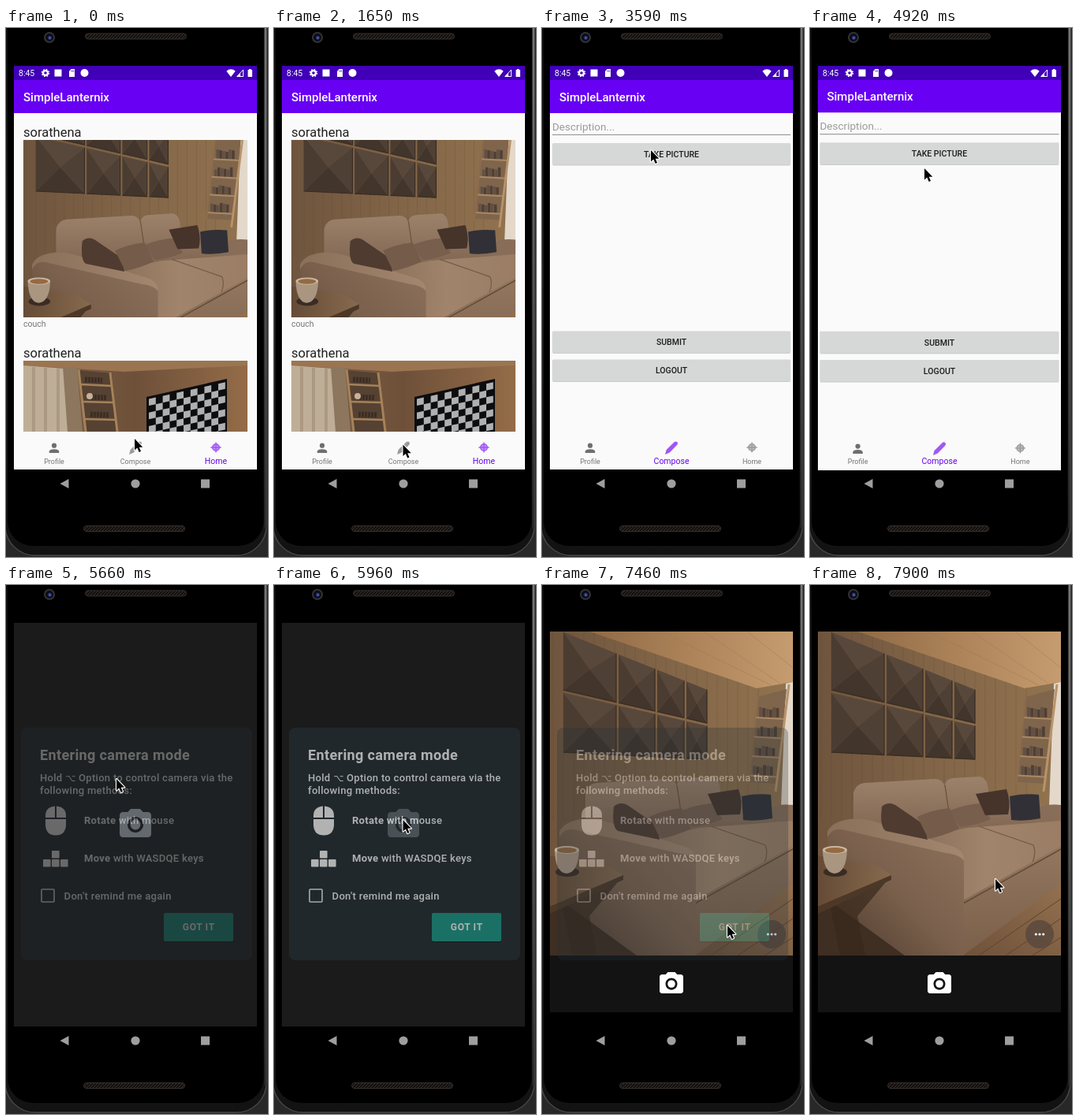
Recreate the animation shown at these times as an HTML page. Size 332 by 671 pixels, loop 8000 ms.

```html
<!DOCTYPE html>
<html lang="en">
<head>
<meta charset="utf-8">
<title>Photo app demo</title>
<style>
  html, body { margin: 0; width: 100%; height: 100%; overflow: hidden; background: #000; }
  svg { display: block; width: 100%; height: 100%; font-family: Roboto, "DejaVu Sans", sans-serif; }
  .mid { text-anchor: middle; }
  .med { font-weight: 500; }
  .bold { font-weight: 700; }
  .msg { font-size: 13px; font-weight: 500; letter-spacing: .3px; }
</style>
</head>
<body>
<svg id="stage" viewBox="0 0 332 671" xmlns="http://www.w3.org/2000/svg"></svg>
<script>
const LOOP = 8000, STEP = 148.8;
const PURPLE = '#6800f4', DEEP = '#4100b8', PAPER = '#fafafa';
const stage = document.getElementById('stage');

// ---- markup helpers
const rect = (x, y, w, h, fill, more = '') =>
  `<rect x="${x}" y="${y}" width="${w}" height="${h}" fill="${fill}" ${more}/>`;
const poly = (pts, fill) => `<polygon points="${pts}" fill="${fill}"/>`;
const path = (d, fill, more = '') => `<path d="${d}" fill="${fill}" ${more}/>`;
const line = (d, color, width = 1, more = '') =>
  `<path d="${d}" fill="none" stroke="${color}" stroke-width="${width}" ${more}/>`;
const circle = (x, y, r, fill, more = '') => `<circle cx="${x}" cy="${y}" r="${r}" fill="${fill}" ${more}/>`;
const text = (x, y, str, size, fill, more = '') =>
  `<text x="${x}" y="${y}" font-size="${size}" fill="${fill}" ${more}>${str}</text>`;
const group = (id, body, more = '') => `<g id="${id}" ${more}>${body}</g>`;
const clip = (id, x, y, w, h) => `<clipPath id="${id}">${rect(x, y, w, h, '#000')}</clipPath>`;
const fade = (id, dir, ...colors) => `<linearGradient id="${id}" ${dir}>` + colors.map((c, i) =>
  `<stop offset="${i / (colors.length - 1)}" stop-color="${c}"/>`).join('') + '</linearGradient>';
const DOWN = 'x1="0" y1="0" x2="0" y2="1"', ACROSS = 'x1="0" y1="0" x2="1" y2="0"';
const SLANT = 'x1="1" y1="0" x2="0" y2="1"';

const defs = `<defs>
  ${clip('screenClip', 10, 48, 308, 523)}${clip('viewClip', 10, 59, 308, 411)}
  ${clip('photo1', 22, 142, 284, 225)}${clip('photo2', 22, 422, 284, 90)}
  ${clip('button1', 13, 146, 302, 28)}
  ${fade('wall', ACROSS, '#6f553e', '#836648', '#91734f')}
  ${fade('ceiling', ACROSS, '#8f6a46', '#ad8459', '#c59c70')}
  ${fade('back', DOWN, '#9d826b', '#7a604c')}
  ${fade('seat', ACROSS, '#8a6f59', '#a0846b', '#9a7d64')}
  ${fade('front', DOWN, '#93775f', '#7a5f4a')}
  ${fade('side', SLANT, '#8e735d', '#7b614d', '#4b382b')}
  ${fade('arm', ACROSS, '#8a6f59', '#a3876f')}
  ${fade('table', ACROSS, '#654b36', '#876a4e')}
  ${fade('floor', SLANT, '#94714f', '#6d503a')}
  ${fade('wall2', ACROSS, '#80654b', '#6e5039', '#946c48')}
  ${fade('edge', DOWN, '#0b0b0b', '#232323', '#121212')}
  ${fade('rim', DOWN, '#777', '#555', '#2b2b2b')}
  <pattern id="mesh" width="4" height="4" patternUnits="userSpaceOnUse">
    ${rect(0, 0, 4, 4, '#14110f')}${line('M0 4L4 0', '#423b35', .8)}</pattern>
</defs>`;

// ---- living room
function panels() {
  const edge = (x, row) => {
    const [a, b] = [[58, 131], [135, 177], [214, 223]][row];
    return a + (b - a) * (x - 27) / 182;
  };
  let out = '';
  for (const [l, r] of [[27, 94], [97, 143], [146, 180], [183, 209]])
    for (const row of [0, 1]) {
      const c = [[l, edge(l, row) + 1.8], [r, edge(r, row) + 1.8], [r, edge(r, row + 1) - 1.8], [l, edge(l, row + 1) - 1.8]];
      const mid = [(l + r) / 2, c.reduce((s, p) => s + p[1], 0) / 4];
      ['#58483b', '#4f4035', '#42352c', '#4b3c31'].forEach((f, i) =>
        out += poly([c[i], c[(i + 1) % 4], mid].join(' '), f));
      out += line(`M${c[3]}L${c[2]} ${c[1]}`, '#382b21', 1.2);
    }
  return out;
}

function ladder() {
  let out = poly('273,142 310,132 297,252 263,250', '#7f654b');
  for (let i = 0; i < 4; i++) {
    const y = 168 + i * 24.5, l = 270 - i * 2.6, r = 306 - i * 3;
    for (let b = 0; b < 6; b++)
      out += rect(l + 5 + b * 4.3, y - 13 + (b * 5 + i * 3) % 4, 3.8, 13 - (b * 5 + i * 3) % 4, b % 2 ? '#513f34' : '#615044');
    out += line(`M${l} ${y}L${r} ${y + 2}`, '#ab8862', 2.2);
  }
  return out + line('M273 142L261 253', '#8e6c4b', 2.5) + line('M313 126L296 262', '#b8936b', 3);
}

function planks() {
  let d = '';
  for (let x = 14; x < 275; x += 13) d += `M${x} 59V300`;
  return line(d, '#5f4935', .7, 'opacity=".35"');
}

const room = rect(10, 59, 308, 411, 'url(#wall)') + planks() +
  poly('60,59 318,59 318,123 272,131', 'url(#ceiling)') +
  line('M150 59L290 127M205 59L302 125M260 59L318 105', '#9d764f', .8, 'opacity=".6"') +
  poly('309,125 318,123 318,280 303,280', '#e3d8ca') + panels() + ladder() +
  path('M10 365L60 385 200 470H10Z', '#3f2e22') +
  poly('190,470 318,375 318,470', 'url(#floor)') +
  line('M214 470L318 398M248 470L318 423M282 470L318 447', '#5d432f', 1) +
  path('M55 312V264Q58 252 70 251L158 246Q168 246 171 256 171 246 181 245L215 243Q225 244 226 262L300 280 318 280V318L150 330Z', 'url(#back)') +
  line('M171 254L176 288', '#684f3d', 1.2) +
  path('M285 283Q300 277 318 279V303H286Z', '#886d58') +
  path('M130 322L200 308 318 299V334L196 405Z', 'url(#seat)') +
  line('M214 306L283 330Q287 340 282 352', '#755b47', 1.3) +
  path('M194 400L318 331V378L194 470Z', 'url(#front)') +
  line('M194 404L318 335', '#614938', 1.5) +
  path('M22 313Q28 300 50 297 70 294 100 306L182 332Q196 337 195 350V470H120L24 400Z', 'url(#side)') +
  path('M22 313Q28 300 50 297 70 294 100 306L182 332Q196 337 195 350 190 342 172 340L40 310Q28 308 22 320Z', 'url(#arm)') +
  path('M91 281Q99 274 108 279L146 305 149 323 96 312Q88 307 91 281Z', '#4f3b30') +
  path('M136 294Q155 285 177 283L189 309Q170 318 150 322Z', '#745b4a') +
  path('M177 286Q198 278 216 277L229 297Q210 305 190 307Z', '#775e4d') +
  path('M210 265L249 259Q255 275 251 291L222 292Z', '#46332a') +
  path('M253 268Q272 264 290 266L292 296Q272 300 255 298Z', '#313036') +
  path('M24 398L100 372 60 420 70 470H38Z', '#38281c', 'opacity=".7"') +
  poly('10,343 85,356 103,368 10,408', 'url(#table)') +
  poly('10,408 103,368 103,374 10,417', '#4d3827') +
  `<ellipse cx="32" cy="364" rx="15" ry="6" fill="#3a2c23"/>` +
  path('M16 336Q17 365 31 366 46 365 47 336Z', '#a99580') +
  `<ellipse cx="31.5" cy="336" rx="15.5" ry="5" fill="#cab7a0"/><ellipse cx="31.5" cy="336.5" rx="12.5" ry="3.5" fill="#946a42"/>`;

// ---- second photo: shelf and checkered screen
function checker() {
  let out = poly('178,468 280,445 280,512 178,512', '#0d0d0f');
  const top = x => 470.5 - (x - 181) * .22;
  for (let c = 0; c < 11; c++) {
    const l = 181 + c * 8.8, r = l + 8.8;
    for (let row = 0; row < 8; row++) if ((c + row) % 2 === 0) {
      const a = row * 8.6, b = a + 8.6;
      out += poly(`${l},${top(l) + a} ${r},${top(r) + a} ${r},${top(r) + b} ${l},${top(l) + b}`, '#aeb1b0');
    }
  }
  return out;
}
const den = rect(22, 422, 284, 90, 'url(#wall2)') + poly('22,422 306,422 306,428 150,436 22,428', '#9b7550') +
  poly('22,428 88,433 92,512 22,512', '#bfae97') + line('M35 430V512M50 431V512M66 432V512', '#a08c74', 4, 'opacity=".6"') +
  path('M72 430H90L97 512H78Z', '#8d765e') + poly('92,434 134,438 142,512 100,512', '#564232') +
  line('M92 433L101 512M132 437L141 512', '#a58259', 3) +
  line('M94 452L135 454M97 474L137 475M99 496L139 497', '#a58259', 2.5) +
  line('M100 446L122 447M104 468L128 469M107 490L130 491', '#3c2e25', 7, 'stroke-dasharray="3 1"') +
  circle(106, 467, 4, '#c7b299') + checker();

// ---- app
const person = circle(61, 529.7, 3.1, '#6f6f6f') + path('M54.8 539V537.2Q55 534.3 61 534.2 67 534.3 67.2 537.2V539Z', '#6f6f6f');
const pencil = c => path('M156 541L157.6 535 167.5 525.3Q169.5 523.6 171.5 525.3 172.7 527 171.2 528.8L161.8 538.5Z', c);
const target = c => circle(266, 532, 4.3, c, `fill-opacity=".65" stroke="${c}" stroke-width="1.4"`) +
  line('M266 525.4V538.6M259.4 532H272.6', c, 1.3);

function tabs(active) {
  const label = (x, str) => str === active
    ? text(x, 552.5, str, 10.5, PURPLE, 'class="mid"') : text(x, 552.5, str, 9, '#757575', 'class="mid"');
  const tint = str => str === active ? '#a057f6' : '#9b9b9b';
  return rect(10, 512, 308, 48, PAPER) + person + pencil(tint('Compose')) + target(tint('Home')) +
    label(61, 'Profile') + label(164, 'Compose') + label(266, 'Home');
}

const USER = 'sorathena';
const feed = text(22, 137.5, USER, 16.5, '#212121') +
  `<g clip-path="url(#photo1)"><g transform="translate(12.78 11.3) scale(.922)">${room}</g></g>` +
  text(22, 378.5, 'couch', 10.5, '#757575') + text(22, 417.5, USER, 16.5, '#212121') +
  `<g clip-path="url(#photo2)">${den}</g>` + tabs('Home');

const button = y => rect(13, y, 302, 28, '#d6d7d7', 'rx="1.5"') + line(`M14 ${y + 28}H314`, '#c4c5c5', .8);
const caption = (y, str) => text(164, y + 17.7, str, 10.5, '#1d1d1d', 'class="mid med"');
const compose = text(13, 130, 'Description...', 13.5, '#9b9b9b') + line('M13 135.4H315', '#7d7d7d', .9) +
  button(146) + `<g clip-path="url(#button1)">${circle(138, 158, 0, '#000', 'id="ripple"')}</g>` + caption(146, 'TAKE PICTURE') +
  button(384.5) + caption(384.5, 'SUBMIT') + button(420.5) + caption(420.5, 'LOGOUT') + tabs('Compose');

const statusBar = rect(10, 48, 308, 18, DEEP) + text(16, 61, '8:45', 10.5, '#fff') +
  circle(50, 57, 2.9, 'none', 'stroke="#fff" stroke-width="2.2"') +
  circle(50, 57, 4.5, 'none', 'stroke="#fff" stroke-width="1.4" stroke-dasharray="1.8 1.73"') +
  rect(61.5, 52.5, 9, 9, '#fff') + path('M80 55L82.5 52H87V62H80Z', '#fff') +
  line('M82.8 53.6V55.6M84.3 53.6V55.6M85.7 53.6V55.6', DEEP, .7) + circle(99.5, 57, 5, '#fff') +
  path('M279.3 54.7Q285 49.8 290.7 54.7L285 62Z', '#fff') +
  path('M292.7 61.5H300.6V53Z', 'none', 'stroke="#fff"') + path('M292.7 61.5H297V57Z', '#fff') +
  rect(306.5, 53, 5.5, 9, '#fff', 'rx=".6"') + rect(308, 52, 2.5, 2, '#fff');

const app = group('app', rect(10, 66, 308, 494, PAPER) + rect(10, 60, 308, 48, PURPLE) +
  text(22, 93, 'SimpleLanternix', 15, '#fff', 'class="med"') + group('feed', feed) + group('compose', compose)) + statusBar;

// ---- camera
const shutter = (x, y, s, fill) => `<g transform="translate(${x - 12 * s} ${y - 11 * s}) scale(${s})">` +
  path('M9 2L7.17 4H4c-1.1 0-2 .9-2 2v12c0 1.1.9 2 2 2h16c1.1 0 2-.9 2-2V6c0-1.1-.9-2-2-2h-3.17L15 2H9zm3 15c-2.76 0-5-2.24-5-5s2.24-5 5-5 5 2.24 5 5-2.24 5-5 5z', fill) +
  circle(12, 12, 3.2, fill) + '</g>';

const view = rect(10, 48, 308, 512, '#000') + `<g clip-path="url(#viewClip)">${room}</g>` +
  rect(10, 470, 308, 72, '#131313') + shutter(164, 504.5, 1.5, '#fff') +
  circle(291, 443, 18, '#58483c', 'opacity=".8"') + [286.3, 291, 295.7].map(x => circle(x, 443, 1.6, '#fff')).join('');

const key = (x, y) => rect(x, y, 9.6, 9.6, '#f2f2f2', 'rx="1"');
const W = '#f0f1f1';
const dialog = rect(19, 181, 293, 295, '#263238', 'rx="8" fill-opacity=".86"') +
  text(43, 222, 'Entering camera mode', 18, W, 'class="bold" letter-spacing=".37"') +
  text(43, 249, 'Hold', 13, W, 'class="msg"') + text(75.5, 249, '⌥', 11.5, W) +
  text(92, 249, 'Option to control camera via the', 13, W, 'class="msg"') +
  text(43, 265.3, 'following methods:', 13, W, 'class="msg"') +
  path('M62 280.5V295H50V293Q50 281.5 62 280.5ZM64 280.5V295H76V293Q76 281.5 64 280.5ZM50 297H76V305Q75 317.5 63 317.5 51 317.5 50 305Z', '#f2f2f2') +
  key(58, 337) + key(47, 348) + key(58, 348) + key(69, 348) +
  text(99, 303, '<tspan class="bold">Rotate</tspan> with mouse', 13, W, 'class="msg"') +
  text(99, 351, '<tspan class="bold">Move</tspan> with WASDQE keys', 13, W, 'class="msg"') +
  rect(45, 386, 16, 16, 'none', 'rx="1" stroke="#e4e6e6" stroke-width="1.6"') +
  text(73.6, 398.5, 'Don\'t remind me again', 13, W, 'class="msg"') +
  rect(200, 417.5, 88, 36, '#000', 'rx="2" opacity=".25"') + rect(200, 416, 88, 36, '#1c9587', 'rx="2"') +
  text(244.3, 438.3, 'GOT IT', 12, W, 'class="mid bold" letter-spacing=".7"');

const camera = group('camera', rect(10, 48, 308, 512, '#1b1b1b') +
  group('splash', shutter(164, 302, 2, '#7f8386')) + group('view', view));

// ---- handset
const speaker = (x, y) => rect(x, y, 128, 7, 'url(#mesh)', 'rx="3.5" stroke="#37312c"');
const phone = rect(0, 0, 332, 671, '#282828') +
  rect(-1, -50, 331, 719, 'url(#edge)', 'rx="38" stroke="#484848" stroke-width="1.4"') +
  rect(2, -50, 324.5, 707, '#000', 'rx="32"') + rect(327.5, 0, 2.5, 635, 'url(#rim)') +
  circle(55, 12, 7, '#333336') + circle(55, 12, 5, '#0c0d16') + circle(55.5, 12.5, 2.4, '#2a3684') + circle(55.5, 12.5, 1, '#6472c4') +
  speaker(100.5, 7) + speaker(98.5, 631.5);
const keys = path('M68.5 578L79.5 572V584Z', '#9e9e9e') + circle(164, 578, 5.6, '#9e9e9e') + rect(247, 572.5, 11, 11, '#9e9e9e');
const pointer = path('M0 0V14.6L3.3 11.6 5.7 17 8 16 5.7 10.8H10.3Z', '#000',
  'id="pointer" stroke="#fff" stroke-width="2.2" stroke-linejoin="round" paint-order="stroke"');

stage.innerHTML = defs + phone +
  `<g clip-path="url(#screenClip)">${group('window', app)}${camera}</g>` + keys + group('dialog', dialog) + pointer;
const el = {};
for (const id of ['window', 'app', 'feed', 'compose', 'camera', 'splash', 'view', 'dialog', 'pointer', 'ripple'])
  el[id] = document.getElementById(id);

// ---- motion: tracks of [tick, value, ...], linear between keys
const MOVE = [[0, 163, 521], [3, 163, 528], [11, 163.5, 528.5], [13, 161, 544], [15, 161, 544], [16, 158, 500], [17, 149, 330],
  [18, 140, 190], [19, 138, 155], [31, 138, 155], [32, 141, 165], [33, 145, 178], [38, 140, 246], [39, 142, 256],
  [41, 185, 340], [43, 228, 420], [45, 235, 432], [52, 235, 432], [53, 235, 373]];
const DIALOG = [[36, 0], [38, .36], [40, .7], [43, 1], [48, 1], [51, 0]];
const CAMERA = [[33, 0], [35, 1]];
const VIEW = [[40, 0], [43, 1]];
const SPLASH = [[35, 0], [37, 1]];
const ZOOM = [[32, 1], [33, 1.004], [35, 1.04]];
const RIPPLE = [[24, 0, 0], [25, 60, .14], [26, 130, .14], [27, 190, .08], [28, 190, 0]];

function at(track, k) {
  const i = track.findIndex(p => p[0] > k);
  if (i < 0) return track[track.length - 1].slice(1);
  if (i === 0) return track[0].slice(1);
  const a = track[i - 1], b = track[i], u = (k - a[0]) / (b[0] - a[0]);
  return a.slice(1).map((v, j) => v + (b[j + 1] - v) * u);
}
const show = (node, alpha) => {
  node.style.display = alpha > 0 ? '' : 'none';
  node.setAttribute('opacity', alpha);
};

function draw(ms) {
  const k = Math.floor(ms % LOOP / STEP);
  const [cover] = at(CAMERA, k);
  el.pointer.setAttribute('transform', `translate(${at(MOVE, k)})`);
  show(el.feed, k < 15 ? 1 : 0);
  show(el.compose, k < 15 ? 0 : 1);
  show(el.window, cover < 1 ? 1 : 0);
  show(el.camera, cover);
  show(el.splash, at(SPLASH, k)[0]);
  show(el.view, at(VIEW, k)[0]);
  show(el.dialog, at(DIALOG, k)[0]);
  const [r, alpha] = at(RIPPLE, k);
  el.ripple.setAttribute('r', r);
  show(el.ripple, alpha);
  el.app.setAttribute('transform', `translate(164 304) scale(${at(ZOOM, k)[0]}) translate(-164 -304)`);
}

const start = performance.now();
function tick() {
  draw(performance.now() - start);
  requestAnimationFrame(tick);
}
draw(0);
requestAnimationFrame(tick);
</script>
</body>
</html>
```
